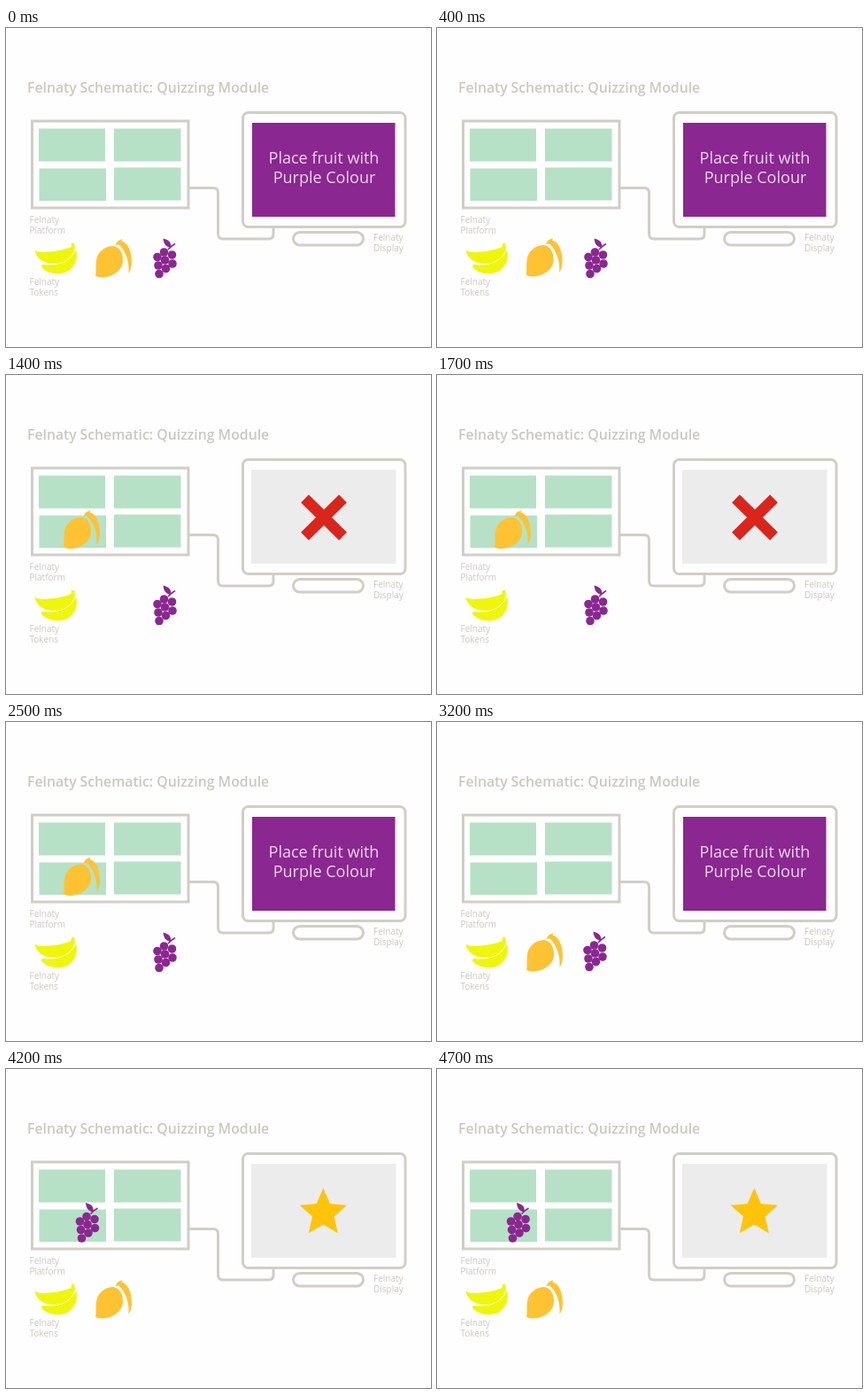
Animation, 480 px wide and 360 px high, one loop 4800 ms. Source, as an HTML page:

```html
<!DOCTYPE html>
<html lang="en">
<head>
<meta charset="utf-8">
<title>Quizzing Module</title>
<style>
  html, body { margin: 0; width: 100%; height: 100%; overflow: hidden; background: #fefefe; }
  svg { display: block; width: 480px; height: 360px; }
  text { font-family: "Open Sans", "Noto Sans", sans-serif; }
  .title { font-size: 15.8px; font-weight: 600; fill: #cbc8c0; }
  .label { font-size: 10px; fill: #cbc8c0; }
  .ask { font-size: 18px; fill: #ecd9ee; text-anchor: middle; }
  .line { fill: none; stroke: #d1cec6; stroke-width: 3; }
  .pad { fill: #b6e1c6; }
  .purple { fill: #8a2790; }
  .mango { fill: #ffc233; }
  .banana { fill: #eff60c; }
</style>
</head>
<body>
<svg viewBox="0 0 480 360">
  <text class="title" x="24" y="73">Felnaty</text>
  <text class="title" x="83.5" y="73">Schematic: Quizzing Module</text>

  <rect class="line" x="29.5" y="105" width="176.5" height="98"/>
  <g class="pad">
    <rect x="37" y="113.5" width="75" height="37"/>
    <rect x="122" y="113.5" width="75.5" height="37"/>
    <rect x="37.5" y="158.5" width="75.5" height="36.5"/>
    <rect x="122" y="157.5" width="75.5" height="37"/>
  </g>
  <path class="line" d="M207 180.5H234Q239.5 180.5 239.5 186V232Q239.5 238 245 238H296.500Q302 238 302 232.500V225"/>
  <rect class="line" x="267.5" y="95.500" width="183.500" height="129" rx="6"/>
  <rect class="line" x="324.5" y="230.500" width="79" height="14.500" rx="7.250"/>

  <g class="label">
    <text x="26.500" y="220">Felnaty</text>
    <text x="26.500" y="232">Platform</text>
    <text x="26.500" y="289.500">Felnaty</text>
    <text x="26.500" y="301.500">Tokens</text>
    <text x="415" y="240">Felnaty</text>
    <text x="415" y="252">Display</text>
  </g>

  <g id="question">
    <rect class="purple" x="278" y="107" width="161.500" height="106"/>
    <text class="ask" x="359" y="153">Place fruit with</text>
    <text class="ask" x="359.500" y="175">Purple Colour</text>
  </g>
  <g id="answer">
    <rect x="277" y="107" width="163.500" height="106" fill="#ececec"/>
    <path id="cross" d="M337.500 139.500L380.500 182M380.500 139.500L337.500 182" stroke="#da251d" stroke-width="12.500"/>
    <polygon id="star" fill="#ffc40a"/>
  </g>

  <g class="banana">
    <path d="M32.500 250.500C37 253.500 43 253 48 252.500C58 252 68 249.500 73.500 247L74 243L77 242.500L78 248.500C76.500 257 69 263 60 265.500C47 268 34 262 32.500 250.500Z"/>
    <path d="M79 250C82.500 262 76 275 62 277C53 278 44 275 40 269.500Q39.500 266.500 43 267C58 269.500 73 264 79 250Z"/>
  </g>
  <g id="mango" class="mango">
    <path d="M101 279.500C102.500 275 100.500 268 102.500 260C104.500 252 112 246.500 120 246C128 246 132.500 254 132 263C131.500 274 120 281 109 281.500Q104 282 101 279.500Z"/>
    <path d="M123.500 245L126 240.500L131.500 238L130.500 240.500C138 242 142 253 142 264Q142 272 138.500 277C139.500 263 135 252 127.500 244.500Z"/>
  </g>
  <g id="grapes" class="purple">
    <path d="M177.500 237.500C184 239 187 242 186 248C180.500 247 178 243.500 177.500 237.500Z"/>
    <path d="M183 250Q186 246.500 191 243.500" fill="none" stroke="#8a2790" stroke-width="1.500"/>
  </g>
</svg>
<script>
  const LOOP = 4800, STEP = 100;
  const $ = id => document.getElementById(id);
  const SVG = "http://www.w3.org/2000/svg";

  const berries = [[178.5, 253], [187.5, 256], [171, 258.5], [179.500, 262],
                   [188, 266], [172, 268], [180.500, 271.500], [173, 277.500]];
  for (const [cx, cy] of berries) {
    const dot = document.createElementNS(SVG, "circle");
    dot.setAttribute("cx", cx);
    dot.setAttribute("cy", cy);
    dot.setAttribute("r", 4.800);
    $("grapes").append(dot);
  }

  const corners = Array.from({ length: 10 }, (_, i) => {
    const a = i * Math.PI / 5, r = i % 2 ? 13 : 28;
    return [358.300 + r * Math.sin(a), 162.500 - r * Math.cos(a)].join();
  });
  $("star").setAttribute("points", corners.join(" "));

  const ease = p => p < 0.5 ? 4 * p ** 3 : 1 - (2 - 2 * p) ** 3 / 2;
  const progress = (t, from, to) => ease(Math.min(1, Math.max(0, (t - from) / (to - from))));
  const show = (id, on) => { $(id).style.display = on ? "" : "none"; };
  const move = (id, dx, dy, p) => $(id).setAttribute("transform", `translate(${dx * p} ${dy * p})`);

  function draw(time) {
    const t = Math.floor(time % LOOP / STEP) * STEP;
    move("mango", -36, -85.500, progress(t, 300, 1000) - progress(t, 2500, 3100));
    move("grapes", -87.500, -86.500, progress(t, 3100, 3800));

    const wrong = t >= 1400 && t < 2200, right = t >= 4200;
    show("question", !wrong && !right);
    show("answer", wrong || right);
    show("cross", wrong);
    show("star", right);
  }

  const start = performance.now();
  function tick() {
    draw(performance.now() - start);
    requestAnimationFrame(tick);
  }
  tick();
</script>
</body>
</html>
```
